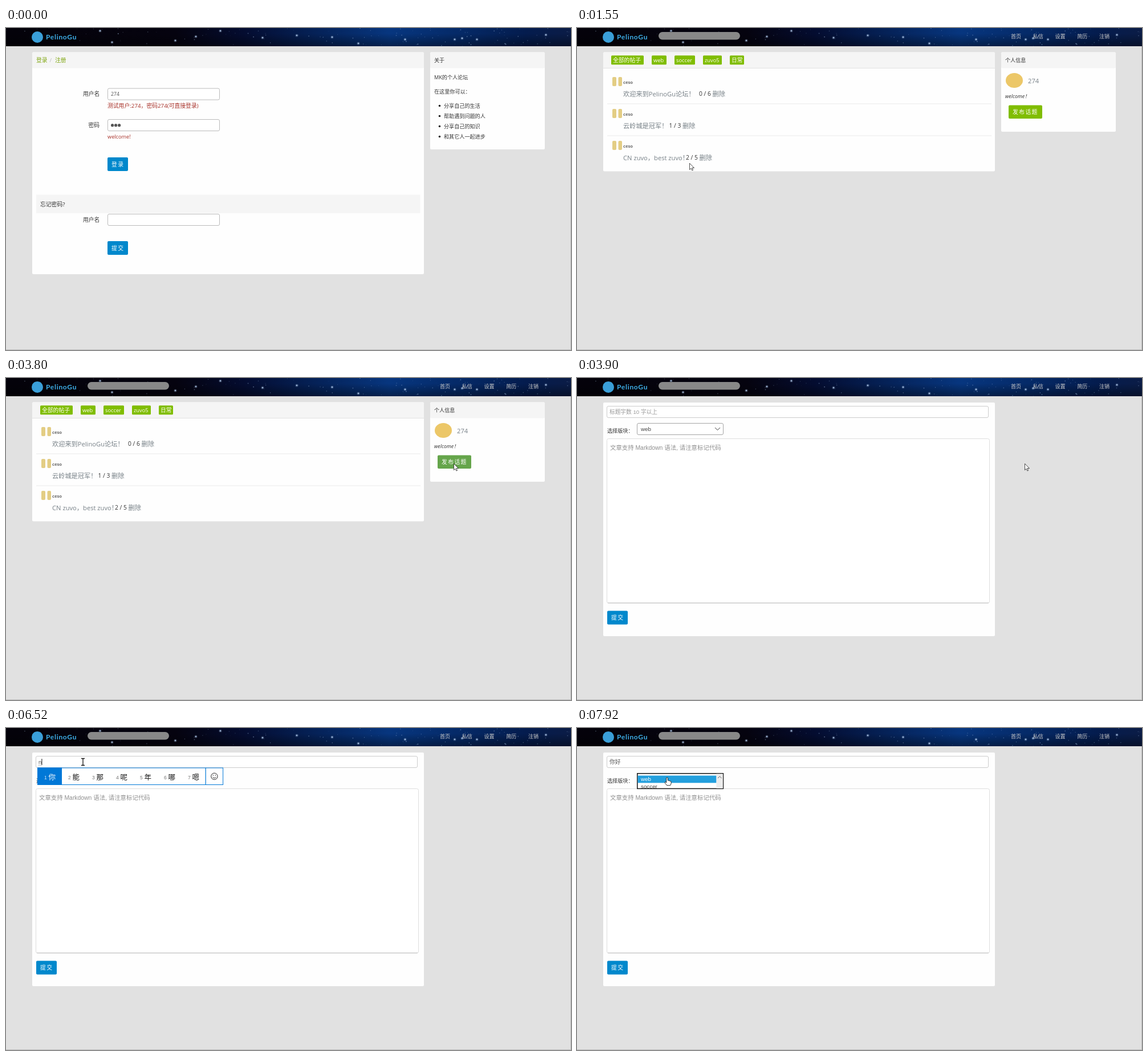
Animation, 991 px wide and 565 px high, one loop 8000 ms. Source, as an HTML page:

```html
<!DOCTYPE html>
<html lang="zh-CN">
<head>
<meta charset="utf-8">
<title>Forum demo</title>
<style>
html, body { margin: 0; width: 100%; height: 100%; overflow: hidden; background: #e1e1e1; }
svg { display: block; width: 991px; height: 565px; }
text { font-family: 'Open Sans', 'Noto Sans CJK SC', 'Noto Sans CJK JP', 'Noto Sans CJK', sans-serif; white-space: pre; }
.arial { font-family: 'Liberation Sans', 'Noto Sans CJK SC', 'Noto Sans CJK JP', 'Noto Sans CJK', sans-serif; }
.logo { font-family: Lato, sans-serif; font-weight: 700; letter-spacing: .7px; }
.bold { font-weight: 700; }
.italic { font-style: italic; }
.btn { letter-spacing: 1.4px; }
.wide { letter-spacing: .9px; }
</style>
</head>
<body>
<svg id="stage" viewBox="0 0 991 565"></svg>
<script>
const LOOP = 8000;
const GREEN = '#80bd01', BLUE = '#0088cc', GREY = '#778087', INK = '#141414';
const stage = document.getElementById('stage');

// ---- markup helpers (text is placed by its vertical middle) ----
const text = (x, cy, str, size = 9.8, fill = '#333', cls = '', more = '') =>
  `<text x="${x}" y="${(cy + size * .37).toFixed(2)}" font-size="${size}" fill="${fill}" class="${cls}" ${more}>${str}</text>`;
const box = (x, y, x2, y2, fill, r = 0, more = '') =>
  `<rect x="${x}" y="${y}" width="${x2 - x}" height="${y2 - y}" rx="${r}" fill="${fill}" ${more}/>`;
const field = (x, y, x2, y2, line = '#bbb', r = 2.5) =>
  box(x + .5, y + .5, x2 - .5, y2 - .5, '#fff', r, `stroke="${line}"`);
const button = (x, y, x2, y2, label, fill, id = '') =>
  box(x, y, x2, y2, fill, 2, id && `id="${id}"`) + text(x + 7, (y + y2) / 2, label, 9.8, '#fff', 'btn');
const card = (x, x2, y2) => box(x, 42.5, x2, y2, '#fefefe', 2) + box(x, 42.5, x2, 70.5, '#f5f5f5', 2);
const group = (id, body) => `<g id="${id}">${body}</g>`;

// ---- header with night sky ----
function sky() {
  let seed = 7, out = '';
  const rnd = () => (seed = seed * 16807 % 2147483647) / 2147483647;
  const dot = (x, y, r, o) => `<circle cx="${x}" cy="${y}" r="${r}" fill="#b9d2f4" opacity="${o}"/>`;
  for (let i = 0; i < 130; i++)
    out += dot((rnd() * 991).toFixed(1), (rnd() * 32).toFixed(1), (.3 + rnd() * .7).toFixed(2), (.12 + rnd() * .35).toFixed(2));
  const bright = [[297, 22], [376, 5], [333, 15], [450, 17], [510, 13], [572, 16], [618, 27], [700, 20],
    [787, 20], [800, 18], [826, 20], [947, 12], [165, 5], [186, 25]];
  for (const [x, y] of bright) out += dot(x, y, 2.6, .25) + dot(x, y, 1.3, .8);
  return out;
}
const stops = [[0, '#04020a'], [.3, '#05030f'], [.42, '#040c30'], [.55, '#052258'], [.68, '#07367f'],
  [.8, '#052a68'], [.92, '#041c4e'], [1, '#0b1c46']];
const header = `<defs>
  <linearGradient id="night">${stops.map(([o, c]) => `<stop offset="${o}" stop-color="${c}"/>`).join('')}</linearGradient>
  <linearGradient id="dusk" x2="0" y2="1"><stop offset=".3" stop-opacity="0"/><stop offset="1" stop-opacity=".4"/></linearGradient>
  <clipPath id="bar">${box(0, 0, 991, 32, '#000')}</clipPath>
  <clipPath id="list">${box(106, 80, 256, 106, '#000')}</clipPath></defs>
  ${box(0, 0, 991, 32, 'url(#night)')}${box(0, 0, 991, 32, 'url(#dusk)')}
  <g clip-path="url(#bar)">${sky()}</g>
  <circle cx="55" cy="16" r="10" fill="#3a9fd8"/>
  ${text(70, 16, 'PelinoGu', 12, '#3fb0ea', 'logo')}
  ${box(990, 32, 991, 565, '#bcbcbc')}${box(0, 564, 991, 565, '#bcbcbc')}`;

const nav = box(143, 7, 286, 20.5, '#888', 6.8) +
  ['首页', '私信', '设置', '简历', '注销'].map((s, i) => text(761 + i * 38.75, 15, s, 9.1, '#ccc')).join('');

// ---- login page ----
const login = card(46, 733, 432) +
  text(53, 56.5, '登录', 9.8, '#7ea50e') + text(76.5, 56.5, '/', 9.8, '#bbb') + text(86, 56.5, '注册', 9.8, '#7ea50e') +
  text(135, 115.5, '用户名') + field(178, 105.5, 375, 126.5) + text(184, 115.5, '274', 8.8, '#555') +
  text(178, 136, '测试用户:274，密码274(可直接登录)', 9.8, '#a8322a') +
  text(144.5, 170, '密码') + field(178, 160, 375, 181) +
  [186.6, 192.6, 198.6].map(x => `<circle cx="${x}" cy="170.7" r="2.6" fill="#555"/>`).join('') +
  text(178, 190.5, 'welcome!', 9.2, '#a8322a') +
  button(178, 227, 214, 251, '登录', BLUE, 'enter') +
  box(53, 292.5, 726.5, 325, '#f5f5f5') + text(60, 309.5, '忘记密码?') +
  text(135, 336.5, '用户名') + field(178, 326, 375, 347) +
  button(178, 374, 214, 398, '提交', BLUE) +
  card(744, 945, 213) + text(751, 56.5, '关于', 9.1) +
  text(751, 86.5, 'MK的个人论坛', 9.1) + text(751, 112, '在这里你可以：', 9.1) +
  ['分享自己的生活', '帮助遇到问题的人', '分享自己的知识', '和其它人一起进步'].map((s, i) =>
    `<circle cx="760.5" cy="${136.5 + i * 18}" r="1.8" fill="#222"/>` + text(768, 136.3 + i * 18, s, 9.1)).join('');

// ---- topic list ----
const tags = [[60, 117, '全部的帖子'], [131, 157, 'web'], [171, 207, 'soccer'], [221, 254, 'zuvo5'], [268, 293, '日常']];
const posts = [['欢迎来到PelinoGu论坛！', '0 / 6', 214], ['云岭城是冠军！', '1 / 3', 161.5], ['CN zuvo，best zuvo！', '2 / 5', 191]];
const topics = card(46, 733, 251.5) + box(46, 70, 733, 71, '#e2e2e2') +
  tags.map(([x, x2, s]) => box(x, 48.3, x2, 64.3, GREEN, 1.5) + text(x + 3, 56.7, s, /\w/.test(s) ? 9.3 : 9.8, '#fff')).join('') +
  posts.map(([title, count, x], i) => {
    const y = i * 56;
    return box(62, 86 + y, 69, 102 + y, '#e3cd84', 2) + box(72.5, 86 + y, 79, 102 + y, '#e3cd84', 2) +
      text(81, 95 + y, 'ceso', 7.7, '#666', 'bold') + text(81, 116 + y, title, 11.2, GREY) +
      text(x, 115 + y, count, 10.3) + text(x + 23.5, 116 + y, '删除', 11.2, GREY) +
      (i < 2 ? box(53, 132.5 + y, 727, 133.5 + y, '#ebebeb') : '');
  }).join('') +
  card(744, 945, 182) + text(751, 56.5, '个人信息', 9.1) +
  '<ellipse cx="767" cy="92" rx="15" ry="13" fill="#ecc768"/>' +
  text(791, 93, '274', 11.2, GREY) + text(751, 119.5, 'welcome！', 8.9, '#333', 'italic') +
  button(757, 135.5, 816, 159, '发布话题', GREEN, 'post');

// ---- editor ----
const editor = box(46, 43, 733, 453, '#fefefe', 2) +
  field(52, 49, 722, 70, '#ccc') + text(57, 59.7, '', 9.7, '#999', 'arial', 'id="title"') +
  '<path id="dots" stroke="#555" stroke-width=".8" stroke-dasharray="1 1" fill="none"/>' +
  box(57, 54, 58, 65, INK, 0, 'id="caret"') +
  text(53, 92.3, '选择版块：', 9.1) +
  group('closed', field(105, 79, 257, 100, '#a5a5a5') + text(112, 89, 'web', 9.8, '#444', 'arial') +
    '<path d="M242 87l4.5 4.5 4.5-4.5" fill="none" stroke="#444"/>') +
  field(52, 106, 724, 395.5, '#dedede', 3) + box(54, 394, 722, 395.2, '#c8c8c8') +
  text(58, 122.6, '文章支持 Markdown 语法, 请注意标记代码', 10.4, '#8e8e8e', 'arial') +
  button(53, 408.5, 89, 432.5, '提交', BLUE) +
  group('opened', box(105.8, 79.8, 256.4, 106.4, '#fff', 0, `stroke="${INK}" stroke-width="1.5"`) +
    `<g clip-path="url(#list)">${box(106.5, 83.5, 244.5, 96.3, '#239fdd')}${box(244.5, 80.5, 256, 106, '#ececec')}
    ${text(112, 89.3, 'web', 9.8, '#fff', 'arial')}${text(112, 102, 'soccer', 9.8, '#444', 'arial')}</g>
    <path d="M247 88l3.3-3.2 3.3 3.2" fill="none" stroke="#666"/>`) +
  group('ime', '');

const pointers = group('arrow', '<path d="M.5 .3V11.6L3.1 9.2 4.9 13 6.6 12.2 4.9 8.5H8.5Z" fill="#fff" stroke="#222" stroke-width=".8"/>') +
  group('beam', `<path d="M-3-6H-.7Q0-6 0-5 0-6 .7-6H3M0-5.4V5.4M-3 6H-.7Q0 6 0 5 0 6 .7 6H3" fill="none" stroke="${INK}" stroke-width="1.3"/>`) +
  group('hand', `<path d="M-1.3 8V1Q-1.2-.2 0-.2T1.3 1V5Q2.8 4.6 3.2 5.7 4.6 5.2 5.2 6.3 6.9 6 7.1 7.5V10.5L5.6 13.8H-.2L-3.8 9.3Q-4.4 8-3.2 7.6-2.4 7.4-1.3 9Z" fill="#fff" stroke="${INK}" stroke-width=".9"/>`);

stage.innerHTML = box(0, 0, 991, 565, '#e1e1e1') + header + group('nav', nav) +
  group('login', login) + group('topics', topics) + group('editor', editor) + pointers;
const el = {};
stage.querySelectorAll('[id]').forEach(n => el[n.id] = n);
const display = (id, on) => el[id].setAttribute('display', on ? 'inline' : 'none');

// ---- pointer path: first step, last step, number of steps, goal, bow ----
const moves = [
  [220, 1010, 11, 188, 239, 0], [1080, 1080, 1, 196, 239, 0], [1240, 1320, 2, 197, 237, 0],
  [1850, 2160, 5, 703, 242, 6], [2390, 2390, 1, 702, 241, 0], [2540, 2630, 2, 701, 242, 0],
  [2710, 3330, 9, 785, 153, 0], [3650, 3650, 1, 785, 150, 0], [3970, 4430, 7, 135, 59.5, 0],
  [7460, 7620, 3, 243, 105, 0], [7690, 7690, 1, 215, 91, 0], [7840, 7840, 1, 182, 89, 0], [7920, 7920, 1, 158, 87, 0]
];
function pointerAt(t) {
  let x = 832, y = 469;
  for (const [t0, t1, n, gx, gy, bow] of moves) {
    if (t < t0) break;
    const step = (t1 - t0) / (n - 1) || 1;
    const k = Math.min(n, Math.floor((t - t0) / step + 1e-6) + 1) / n;
    const p = k * k * (3 - 2 * k);
    x += (gx - x) * p;
    y += (gy - y) * p + bow * Math.sin(Math.PI * p);
  }
  return [x, y];
}

// ---- typing ----
const typed = [[0, ''], [6350, 'n'], [6670, 'ni'], [6750, "ni'h"], [6830, "ni'ha"], [6910, "ni'hao"], [7140, '你好']];
const choices = {
  n: '你 能 那 呢 年 哪 嗯', ni: '你 呢 泥 拟 尼 逆 腻',
  "ni'h": '你好 你会 你还 女孩 年后 你和 那会', "ni'ha": '你好 你还 你哈 拟好 你号 泥好 你孩',
  "ni'hao": '你好 你号 拟好 倪浩 \\(@^0^@)/ 你哈哦 泥嚎'
};
const last = (list, t) => list.filter(e => t >= e[0]).pop()[1];

function drawIme(word) {
  let x = 55, body = '', cell = 0;
  choices[word].split(' ').forEach((s, i) => {
    const cls = s[0] === '\\' ? 'wide' : '';
    el.ime.innerHTML = text(0, 0, s, 12.5, '#000', cls);
    const w = el.ime.firstChild.getComputedTextLength();
    x += 12;
    body += text(x, 87, i + 1, 8.5, i ? '#777' : '#cfe5f8', 'arial') + text(x + 7.5, 86, s, 12.5, i ? INK : '#fff', cls);
    x += 7.5 + w + 10;
    if (!i) cell = x;
  });
  x += 1;
  el.ime.innerHTML = field(55, 69.5, x + 31, 100, '#0078d7', 0) + box(55, 69.5, cell + 1, 100, '#0078d7') +
    box(x - .5, 70, x + .7, 100, '#0078d7') + body +
    `<g transform="translate(${x + 15.3} 84.8)" fill="none" stroke="#222"><circle r="5.7"/><path d="M-3 1.3Q0 5 3 1.3"/>
    <path d="M-2-2.6v1.4M2-2.6v1.4" stroke-width="1.3"/></g>`;
}

let shown = null;
function setTitle(word) {
  if (word === shown) return;
  shown = word;
  el.title.textContent = word || '标题字数 10 字以上';
  el.title.setAttribute('fill', word ? '#555' : '#999');
  const w = word ? el.title.getComputedTextLength() : 0;
  el.caret.setAttribute('x', 57 + w);
  el.dots.setAttribute('d', choices[word] ? `M57 65.2h${w}` : '');
  if (choices[word]) drawIme(word);
}

const blink = [[0, 0], [4800, .5], [4880, 1], [5340, .5], [5440, 0], [5810, .5], [5890, 1], [7690, 0]];
const enterFill = [[0, BLUE], [1080, '#0052cc']];
const postFill = [[0, GREEN], [3420, '#72b126'], [3510, '#65a54b']];

function draw(t) {
  const page = t < 1550 ? 'login' : t < 3900 ? 'topics' : 'editor';
  for (const id of ['login', 'topics', 'editor']) display(id, id === page);
  display('nav', page !== 'login');
  el.enter.setAttribute('fill', last(enterFill, t));
  el.post.setAttribute('fill', last(postFill, t));

  if (page === 'editor') {
    const word = last(typed, t);
    // kept in layout while hidden, so that its text can be measured
    el.ime.setAttribute('visibility', t >= 6430 && word in choices ? 'visible' : 'hidden');
    setTitle(word);
    display('opened', t >= 7840);
    display('closed', t < 7840);
    el.caret.setAttribute('opacity', last(blink, t));
  }

  const [x, y] = pointerAt(t);
  const inText = page === 'editor' && x > 52 && x < 723 && ((y > 49 && y < 70) || (y > 106 && y < 395));
  const kind = t < 220 ? '' : t >= 7840 ? 'hand' : inText ? 'beam' : 'arrow';
  for (const id of ['arrow', 'beam', 'hand']) display(id, id === kind);
  if (kind) el[kind].setAttribute('transform', `translate(${x} ${y})`);
}

function tick() {
  draw(performance.now() % LOOP);
  requestAnimationFrame(tick);
}
tick();
</script>
</body>
</html>
```
